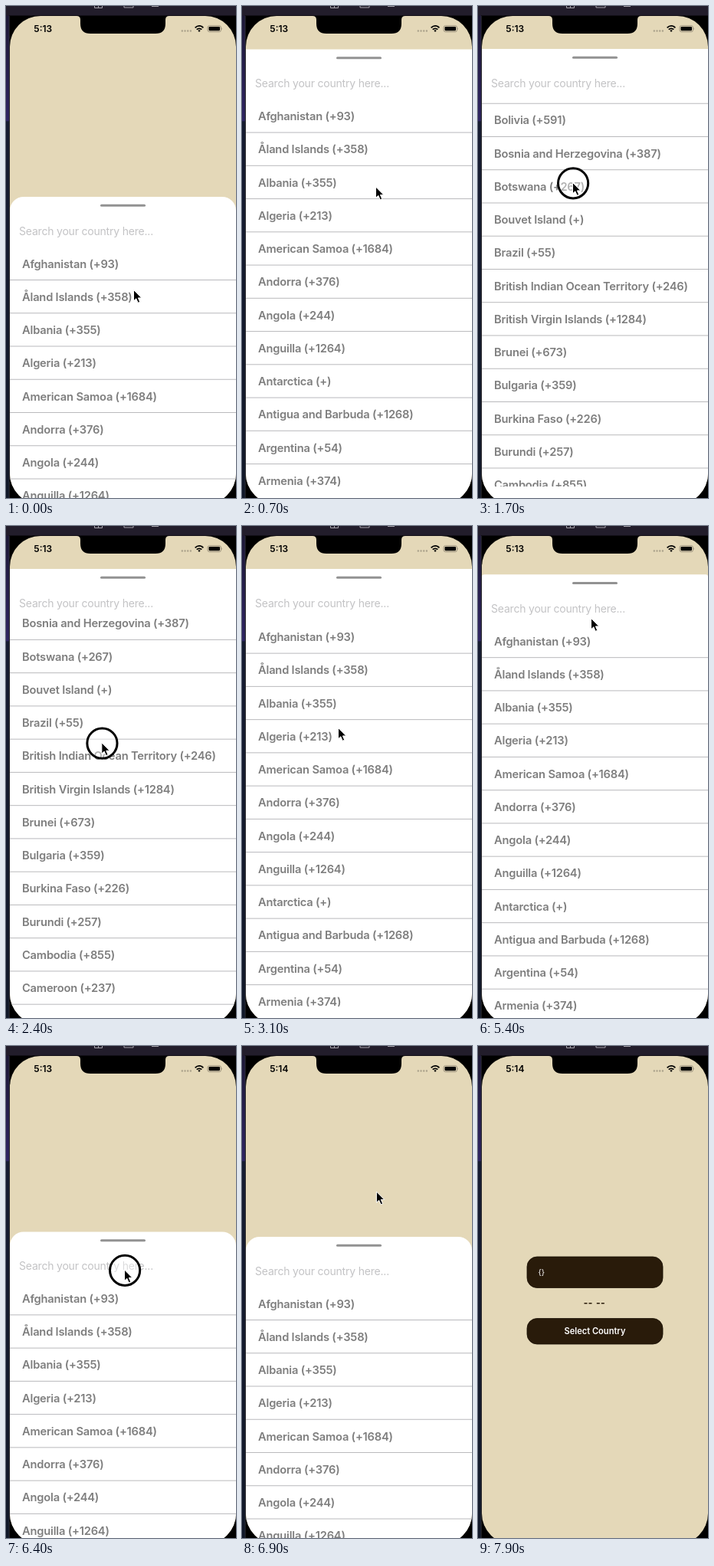
An HTML page for the animation above (8200 ms loop, 300 by 642 pixels).

```html
<!DOCTYPE html>
<html lang="en">
<head>
<meta charset="utf-8">
<title>Country picker</title>
<style>
html, body { margin: 0; width: 100%; height: 100%; overflow: hidden; background: #000; }
svg { display: block; width: 300px; height: 642px; font-family: Inter, Roboto, sans-serif; }
.row { font-size: 14.7px; font-weight: 600; letter-spacing: -.2px; fill: #7e7e7e; }
.hint { font-size: 14px; letter-spacing: -.2px; fill: #c3c3c5; }
.time { font-size: 12px; font-weight: 600; text-anchor: middle; }
.pick { font-size: 11.1px; font-weight: 600; text-anchor: middle; fill: #fff; }
</style>
</head>
<body>
<svg viewBox="0 0 300 642">
  <defs>
    <clipPath id="screen"><rect x="5" y="13" width="295" height="637" rx="40"/></clipPath>
    <clipPath id="list"><rect x="5" y="65" width="295" height="506"/></clipPath>
    <linearGradient id="wall" x2="0" y2="1">
      <stop offset="0" stop-color="#1b1732"/>
      <stop offset=".233" stop-color="#2e2462"/>
      <stop offset=".235" stop-color="#151b31"/>
      <stop offset="1" stop-color="#111829"/>
    </linearGradient>
  </defs>

  <rect width="300" height="642"/>
  <rect width="4" height="642" fill="url(#wall)"/>
  <path d="M4.200 13V642" stroke="#4b4a55" stroke-width=".6"/>
  <rect width="300" height="12.500" fill="#221d2b"/>
  <path d="M115.500 0V2.500H125.500V0M120.500 0V2M154 0V2H166V0M190 .5H199" fill="none" stroke="#a5a2aa"/>

  <g clip-path="url(#screen)">
    <rect x="5" y="13" width="295" height="640" fill="#e4d8b8"/>
    <g fill="#291b0a" stroke="#191004" stroke-width=".8">
      <rect x="64" y="275" width="177" height="40.500" rx="13"/>
      <rect x="64" y="355.500" width="177" height="33.500" rx="13"/>
    </g>
    <text x="78.500" y="298.500" font-size="10" fill="#fff">{}</text>
    <path d="M138.500 335.800h4m2 0h4m6.300 0h4m2 0h4" stroke="#291b0a" stroke-width="1.500"/>
    <text class="pick" x="152.500" y="376.300">Select Country</text>

    <g id="sheet">
      <rect id="panel" x="5" width="295" height="900" fill="#fff"/>
      <rect x="123" y="9.800" width="59" height="3" rx="1.500" fill="#929292"/>
      <text class="hint" x="17" y="49.700">Search your country here...</text>
      <g clip-path="url(#list)"><g id="rows"></g></g>
    </g>

    <path d="M92 13Q97 13 97 18V23Q97 36 110 36H195Q208 36 208 23V18Q208 13 213 13Z"/>
    <text class="time" id="clock" x="48.300" y="34.200"></text>
    <path d="M229.800 32.500h12" stroke="#aaa18a" stroke-width="2.400" stroke-linecap="round" stroke-dasharray="0 3.700"/>
    <g fill="none" stroke="#000" stroke-width="1.700">
      <path d="M246.600 28.300Q252 23.600 257.400 28.300M248.700 30.700Q252 27.900 255.300 30.700"/>
      <path d="M250.300 32L252 34L253.700 32Q252 30.700 250.300 32Z" fill="#000" stroke="none"/>
    </g>
    <rect x="263" y="25.700" width="17.500" height="8" rx="2.400" fill="none" stroke="#958b76" stroke-width=".9"/>
    <rect x="264.500" y="27.100" width="14.500" height="5.200" rx="1.200"/>
    <path d="M281.500 28.300Q283 29.700 281.500 31.200Z" fill="#958b76"/>
  </g>

  <g id="pointer">
    <circle id="ring" cx=".6" cy=".8" r="19.600" fill="#fff" fill-opacity=".4" stroke="#000" stroke-width="3"/>
    <path d="M0 0V14.300L3.300 11.300L5.700 16.800L8.200 15.700L5.900 10.400H10.300Z" stroke="#fff" stroke-linejoin="round"/>
  </g>
</svg>
<script>
const LOOP = 8200, STEP = 100, PITCH = 43.25, OPEN = 56, HALF = 249;
const $ = id => document.getElementById(id);

const countries = `Afghanistan +93|Åland Islands +358|Albania +355|Algeria +213|American Samoa +1684|Andorra +376
Angola +244|Anguilla +1264|Antarctica +|Antigua and Barbuda +1268|Argentina +54|Armenia +374|Aruba +297|Australia +61
Austria +43|Azerbaijan +994|Bahamas +1242|Bahrain +973|Bangladesh +880|Barbados +1246|Belarus +375|Belgium +32
Belize +501|Benin +229|Bermuda +1441|Bhutan +975|Bolivia +591|Bosnia and Herzegovina +387|Botswana +267
Bouvet Island +|Brazil +55|British Indian Ocean Territory +246|British Virgin Islands +1284|Brunei +673
Bulgaria +359|Burkina Faso +226|Burundi +257|Cambodia +855|Cameroon +237|Canada +1|Cape Verde +238
Cayman Islands +1345|Central African Republic +236|Chad +235|Chile +56|China +86|Christmas Island +61
Cocos (Keeling) Islands +61|Colombia +57|Comoros +269`.split(/[|\n]/);

$('rows').innerHTML = countries.map((name, i) => {
  const y = i * PITCH;
  return `<text class="row" x="21" y="${y + 92.5}">${name.replace(/(\+\d*)$/, '($1)')}</text>` +
    `<path d="M5 ${y + 108.5}H300" stroke="#b9b9bc"/>`;
}).join('');

const part = (t, a, b) => Math.min(1, Math.max(0, (t - a) / (b - a)));
const smooth = p => p * p * (3 - 2 * p);
const settle = p => 1 - (1 - p) ** 3;
const pulse = p => Math.sin(Math.PI * p) ** 4;

// Flicked open, nudged, dragged to half height, then dismissed.
const sheetTop = t => HALF
  + (OPEN - HALF) * settle(part(t, 100, 800))
  + 60 * pulse(part(t, 4600, 5600))
  + (HALF - OPEN) * smooth(part(t, 5600, 6500))
  + 410 * smooth(part(t, 6900, 7300));

// Down the list and back, with a small bounce at the top.
const listScroll = t =>
  1510 * (smooth(part(t, 900, 2100)) - smooth(part(t, 2100, 3100))) - 2 * pulse(part(t, 2900, 3400));

const stops = [[100, 166.5, 370.5], [500, 172, 238], [700, 174.5, 236], [1000, 140, 330], [1700, 123.5, 230.5],
  [2100, 124, 190], [2500, 125, 300], [3100, 125.5, 263.5], [3500, 125.5, 263.5], [4400, 150, 70], [4600, 150, 70],
  [5400, 147.5, 120.5], [5600, 150, 105], [6400, 154.5, 292], [6900, 175.4, 190], [7300, 175.4, 190], [7700, 199.5, 598.5]];
const presses = [[100, 450], [1600, 1850], [2300, 2500], [4700, 5100], [5700, 6450], [7000, 7400]];

function pointerAt(t) {
  let [, x, y] = stops[0];
  for (let i = 1; i < stops.length; i++) {
    const [from, x0, y0] = stops[i - 1], [to, x1, y1] = stops[i];
    const p = smooth(part(t, from, to));
    x += (x1 - x0) * p;
    y += (y1 - y0) * p;
  }
  return [x, y];
}

function draw(t) {
  const top = sheetTop(t), [x, y] = pointerAt(t);
  $('sheet').setAttribute('transform', `translate(0 ${top})`);
  $('panel').setAttribute('rx', Math.min(18, Math.max(0, (top - OPEN - 1) * .5)));
  $('rows').setAttribute('transform', `translate(0 ${-listScroll(t)})`);
  $('pointer').setAttribute('transform', `translate(${x} ${y})`);
  $('pointer').setAttribute('visibility', t < 7900 ? 'visible' : 'hidden');
  $('ring').setAttribute('opacity', presses.some(([a, b]) => t >= a && t < b) ? 1 : 0);
  $('clock').textContent = t < 6900 ? '5:13' : '5:14';
}

const start = performance.now();
function tick() {
  const t = (performance.now() - start) % LOOP;
  draw(Math.floor(t / STEP) * STEP);
  requestAnimationFrame(tick);
}
tick();
</script>
</body>
</html>
```
